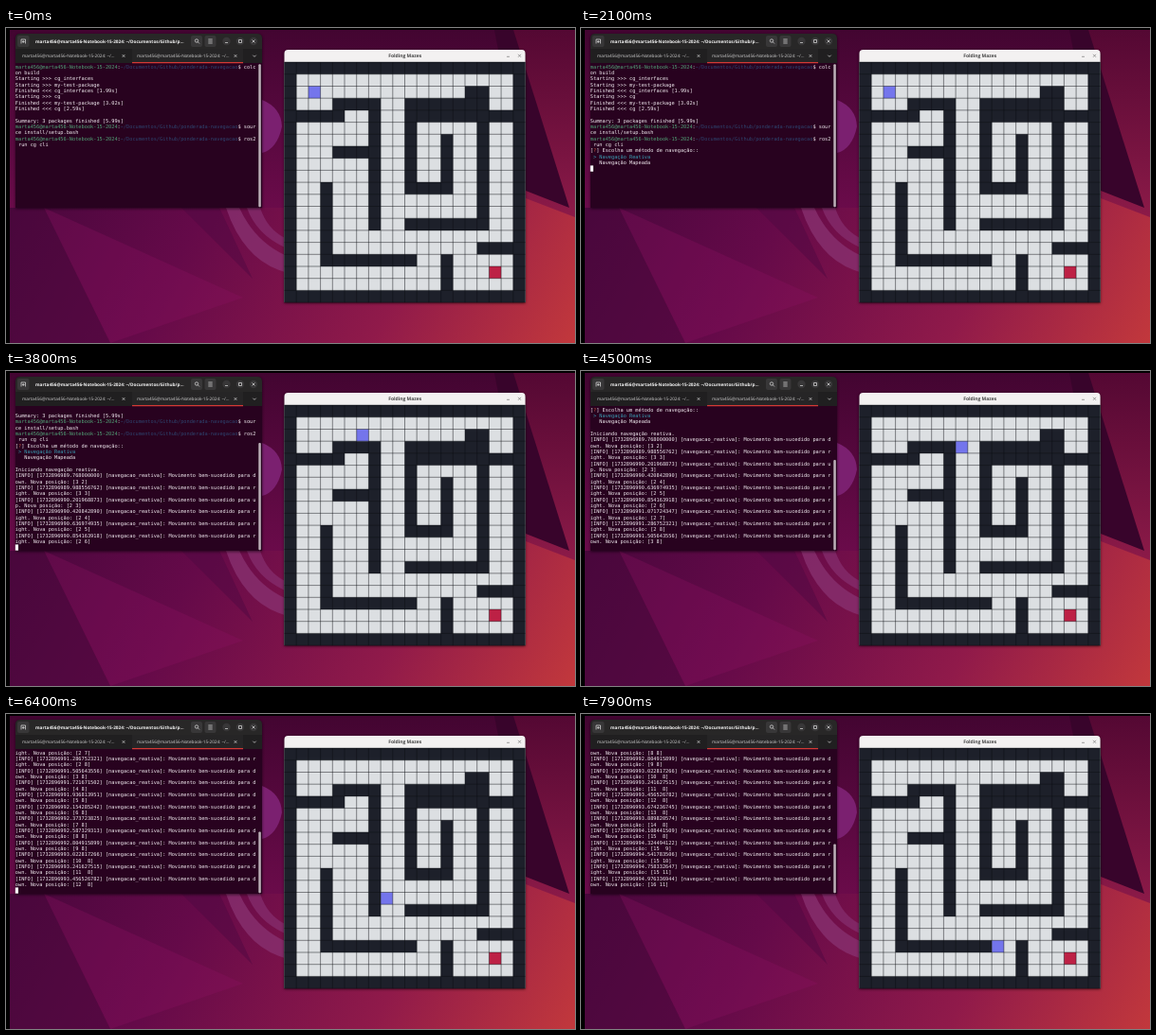
An HTML page that plays this animation: 600 px wide and 333 px high, repeating every 8 s.

```html
<!DOCTYPE html>
<html lang="pt">
<head>
<meta charset="utf-8">
<title>Maze navigation</title>
<style>
  html, body { margin: 0; width: 100%; height: 100%; overflow: hidden; background: #000; }
  svg { display: block; width: 600px; height: 333px; }
  text { white-space: pre; text-rendering: geometricPrecision; }
  .frame { filter: drop-shadow(0 1px 1.5px #0009); }
  .ui { font-family: "Open Sans", "Noto Sans", sans-serif; font-size: 4.6px; fill: #d2d2d2; }
  .ui.title { font-size: 4.7px; font-weight: 700; fill: #f4f4f4; }
  .ui.dark { font-size: 5px; fill: #444; }
  #rows text { font: 5.28px "DejaVu Sans Mono", monospace; fill: #f3eef2; }
  #rows .user { fill: #52a678; }
  #rows .path { fill: #2e456f; }
  #rows .ask { fill: #c0503c; }
  #rows .pick { fill: #3aa0b4; }
  .icon { fill: none; stroke: #e0e0e0; stroke-width: .7; }
  .icon.dark { stroke: #777; }
  #walls { fill: none; stroke: #1d202a; stroke-width: 1; stroke-linecap: square; }
  #lines { fill: none; stroke: #0c0d12; stroke-width: .05; opacity: .75; }
</style>
</head>
<body>
<svg viewBox="0 0 600 333">
  <defs>
    <linearGradient id="sky" gradientUnits="userSpaceOnUse" x1="40" y1="40" x2="600" y2="333">
      <stop offset="0" stop-color="#43063a"/>
      <stop offset=".35" stop-color="#650a49"/>
      <stop offset=".7" stop-color="#901a4a"/>
      <stop offset="1" stop-color="#c2383c"/>
    </linearGradient>
    <linearGradient id="roof" x1="0" y1="0" x2="0" y2="1">
      <stop offset="0" stop-color="#430531"/>
      <stop offset="1" stop-color="#6a0b4a"/>
    </linearGradient>
    <linearGradient id="side" x1="0" y1="0" x2="0" y2="1">
      <stop offset="0" stop-color="#540833"/>
      <stop offset="1" stop-color="#8c1a48"/>
    </linearGradient>
  </defs>

  <g id="wallpaper">
    <path fill="url(#sky)" d="M4 2H600V333H4z"/>
    <path fill="url(#roof)" d="M4 2H548V190H4z"/>
    <path fill="url(#side)" d="M532 2H600V200L548 180z"/>
    <path fill="#38042b" d="M515 2H535L594 190L548 172z"/>
    <path fill="#4a083c" d="M4 190H40L110 333H4z" opacity=".5"/>
    <path fill="#8a1260" d="M40 190L250 285L110 333z" opacity=".3"/>
    <path fill="#4c0840" d="M185 190H225L260 265z" opacity=".45"/>
    <path fill="#7b2070" d="M270 76Q290 84 291 104Q286 128 270 132z"/>
    <path fill="#87306f" d="M232 190H246Q262 225 294 240V258Q250 245 232 190z" opacity=".8"/>
    <path fill="#87306f" d="M254 190H268Q275 212 294 222V232Q264 218 254 190z" opacity=".7"/>
  </g>

  <g id="terminal">
    <path class="frame" fill="#28021f" d="M10 190V11Q10 6 15 6H265Q270 6 270 11V190z"/>
    <path fill="#282727" d="M10 22V11Q10 6 15 6H265Q270 6 270 11V22z"/>
    <path fill="#201f20" d="M10 22H270V37H10z"/>
    <path fill="#262526" d="M133 22H250V37H133z"/>
    <path fill="#d13a35" d="M133 36H250V37.200H133z"/>
    <g fill="#383738">
      <rect x="12" y="8" width="12.500" height="12" rx="2"/>
      <rect x="195" y="8" width="12" height="12" rx="2"/>
      <rect x="209.500" y="8" width="12" height="12" rx="2"/>
      <circle cx="232.500" cy="14" r="4.200"/>
      <circle cx="247" cy="14" r="4.200"/>
      <circle cx="261" cy="14" r="4.200"/>
    </g>
    <path class="icon" d="M16 16.500V12H20.500V16.500M18.200 13V16M16.800 14.500H19.700"/>
    <path class="icon" d="M202 14.500L204 16.500M213.300 12h4.400m-4.400 2h4.400m-4.400 2h4.400"/>
    <path class="icon" d="M231 15.500h3M245.500 12.500h3v3h-3zM259.500 12.500l3 3m0-3l-3 3"/>
    <path class="icon" d="M122.700 28.200l2.600 2.600m0-2.600l-2.600 2.600M240.700 28.200l2.600 2.600m0-2.600l-2.600 2.600M260.300 28.700l1.700 1.700l1.700-1.700"/>
    <circle class="icon" cx="201" cy="13.500" r="1.700"/>
    <text class="ui title" x="31" y="15.700">marta456@marta456-Notebook-15-2024: ~/Documentos/Github/p...</text>
    <text class="ui" x="17" y="31.200">marta456@marta456-Notebook-15-2024: ~/...</text>
    <text class="ui" x="138" y="31.200">marta456@marta456-Notebook-15-2024: ~/...</text>
    <g id="rows"></g>
    <rect id="cursor" width="3.200" height="6.300" fill="#fff"/>
    <rect id="thumb" x="266.300" width="2.500" rx="1" fill="#bdb2b9"/>
  </g>

  <g id="game">
    <path class="frame" fill="#f3f1f1" d="M293.500 290V27Q293.500 23 297.500 23H544Q547.600 23 547.600 27V290z"/>
    <text class="ui title dark" x="420.700" y="31.200" text-anchor="middle">Folding Mazes</text>
    <path class="icon dark" d="M528 30.300h3M540 27.800l3 3m0-3l-3 3"/>
    <!-- one unit is one cell -->
    <g transform="translate(293.5 36.1) scale(12.7)">
      <path fill="#dcdfe2" d="M0 0H20V20H0z"/>
      <path id="walls" transform="translate(.5 .5)" d="M0 0H19V19H0z
        M4 3H7V13 M1 4H4 M4 7H7 M3 10V16H10 M13 16V18 M16 15H18
        M15 2H16V13H10 M10 3H16 M10 4H18 M10 3V10H13V6"/>
      <rect x="17" y="17" width="1" height="1" fill="#bd2145"/>
      <rect id="player" width="1" height="1" fill="#7475ec"/>
      <path id="lines"/>
    </g>
  </g>
</svg>
<script>
const LOOP = 8000, TICK = 100, BLINK = 605;
const ROWS = 24, COLS = 80, CW = 3.18, LH = 6.33, TX = 9.8, TY = 37.8;
const ENTER_AT = 1500, MENU_AT = 1800, START_AT = 2295, FIRST_MOVE = 2565, STEP = 216.87;
const $ = id => document.getElementById(id);
const attrs = (el, o) => { for (const k in o) el.setAttribute(k, o[k]); };

let grid = '';
for (let i = 0; i <= 20; i++) grid += `M${i} 0V20M0 ${i}H20`;
$('lines').setAttribute('d', grid);

// Terminal contents
const prompt = cmd => '<tspan class="user">marta456@marta456-Notebook-15-2024</tspan>:' +
  `<tspan class="path">~/Documentos/Github/ponderada-navegacao</tspan>$ ${cmd}`;
const begin = p => `Starting &gt;&gt;&gt; ${p}`;
const done = (p, s) => `Finished &lt;&lt;&lt; ${p} [${s}s]`;
const shell = [
  prompt('colc'), 'on build',
  begin('cg_interfaces'), begin('my-test-package'), done('cg_interfaces', '1.99'),
  begin('cg'), done('my-test-package', '3.02'), done('cg', '2.59'), '',
  'Summary: 3 packages finished [5.99s]',
  prompt('sour'), 'ce install/setup.bash',
  prompt('ros2'), ' run cg cli'
];
const menu = [
  '[<tspan class="ask">?</tspan>] Escolha um método de navegação::',
  '<tspan class="pick"> &gt; Navegação Reativa</tspan>', '   Navegação Mapeada'
];
const lines = [...shell, ...menu, '', 'Iniciando navegação reativa.'];
const INTRO = lines.length;

// The robot walks the route and logs two lines per move
const noise = i => Math.abs(Math.sin(i * 12.9898) * 43758.5453) % 1;
const dirs = { d: ['down', 1, 0], r: ['right', 0, 1], u: ['up', -1, 0] };
const route = [[2, 2]];
[...'dru' + 'r'.repeat(5) + 'd'.repeat(13) + 'rrrd'].forEach((key, i) => {
  const [word, dr, dc] = dirs[key];
  const r = route[i][0] + dr, c = route[i][1] + dc;
  route.push([r, c]);
  const stamp = (989.768 + i * STEP / 1000 + noise(i) * .004).toFixed(9);
  const log = `[INFO] [1732896${stamp}] [navegacao_reativa]: ` +
    `Movimento bem-sucedido para ${word}. Nova posição: [${r} ${String(c).padStart(r > 9 ? 2 : 1)}]`;
  lines.push(log.slice(0, COLS), log.slice(COLS));
});

const rows = Array.from({ length: ROWS }, (_, i) => {
  const el = document.createElementNS('http://www.w3.org/2000/svg', 'text');
  attrs(el, { x: TX, y: TY + i * LH + 5 });
  return $('rows').appendChild(el);
});

function draw(t) {
  const started = t >= START_AT, typing = t < ENTER_AT;
  const steps = Math.floor((t - FIRST_MOVE) / STEP) + 1;
  const moves = Math.max(0, Math.min(route.length - 1, steps));
  const count = started ? INTRO + 2 * moves : shell.length + (t >= MENU_AT ? menu.length : 0);
  const top = Math.max(0, count + 1 - ROWS);
  rows.forEach((el, i) => { el.innerHTML = top + i < count ? lines[top + i] : ''; });

  // Each Enter restarts the blink
  const key = started ? START_AT : typing ? ENTER_AT - 2 * BLINK : ENTER_AT;
  const lit = t >= key && Math.floor((t - key) / BLINK) % 2 === 0;
  attrs($('cursor'), {
    x: TX + (typing ? 11 * CW : 0),
    y: TY + (typing ? shell.length - 1 : count - top) * LH,
    visibility: lit ? 'visible' : 'hidden'
  });

  const h = 151 * ROWS / (top + ROWS);
  attrs($('thumb'), { y: 189.3 - h, height: h });
  const [r, c] = route[moves];
  attrs($('player'), { x: c, y: r });
}

let last = -1;
function loop(now) {
  const t = Math.floor(now % LOOP / TICK) * TICK;
  if (t !== last) draw(last = t);
  requestAnimationFrame(loop);
}
draw(0);
requestAnimationFrame(loop);
</script>
</body>
</html>
```
